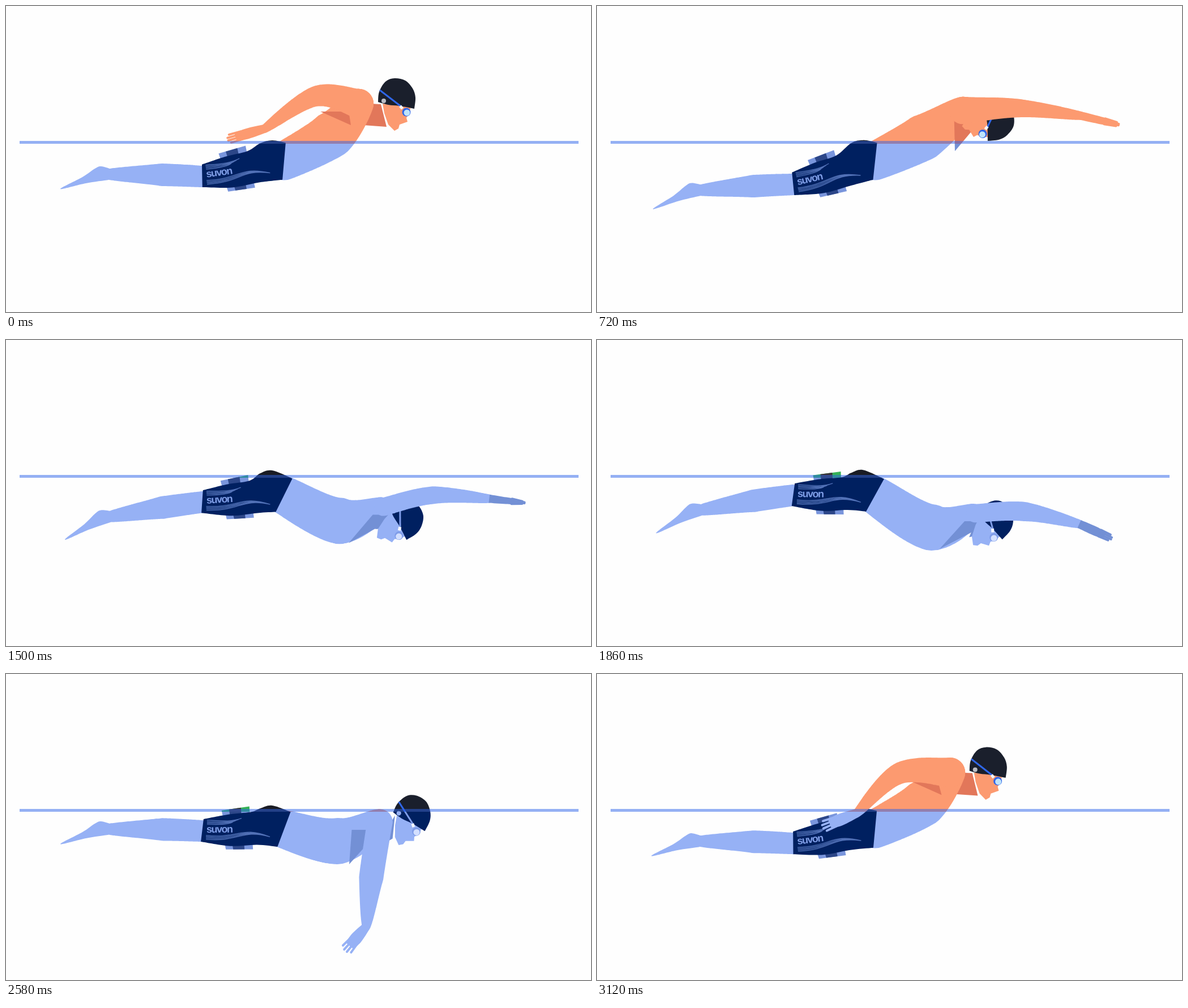
These frames come from a looping animation (1033 by 542 pixels, 3180 ms). An HTML page with a canvas:

```html
<!DOCTYPE html>
<html lang="en">
<head>
<meta charset="utf-8">
<title>Butterfly stroke</title>
<style>
  html, body { margin: 0; width: 100%; height: 100%; overflow: hidden; background: #fefefe; }
  canvas { display: block; }
</style>
</head>
<body>
<canvas id="stage" width="1033" height="542"></canvas>
<script>
const ctx = document.getElementById('stage').getContext('2d');
const LOOP = 3180, STEP = 60, SURFACE = 244;

const AIR = {
  skin: '#fc9a70', palm: '#fc9a70', shade: '#e2775a', suit: '#1a1c24', cap: '#1a1f2c', print: '#7f9de6',
  float: '#35b157', band: '#3a3236', strap: '#2f66e8', lens: '#bfe4fb', badge: '#b9bcc4'
};
const WATER = {
  skin: '#96b1f5', palm: '#7390d5', shade: '#7390d5', suit: '#002060', cap: '#002060', print: '#7f9de6',
  float: '#7995dc', band: '#2c4688', strap: '#7f9ce8', lens: '#d3dfff', badge: '#96b1f5'
};

// time, knee y, shin angle, rib y, shoulder x, y, armpit x, y, head x, y, turn
const poses = [
  [0, 302, 0, 228, 623, 173, 609, 211, 690, 160, 0],
  [720, 316, -5, 233, 646, 185, 632, 257, 705, 204, 78],
  [1140, 305, -10, 295, 665, 269, 605, 336, 707, 313, 68],
  [1860, 275, -10.5, 332, 668, 307, 605, 370, 704, 317, 37],
  [2340, 276, -2.7, 312, 698, 300, 617, 346, 709, 281, 28],
  [2580, 278, -.3, 296, 660, 262, 606, 337, 718, 247, 20]
];
// time, elbow x, y, fingertip x, y
const strokes = [
  [0, 547, 160, 388, 237], [360, 640, 160, 672, 172], [720, 745, 181, 925, 211],
  [1140, 752, 242, 923, 243], [1860, 755, 304, 912, 353], [2340, 759, 345, 768, 500],
  [2460, 718, 358, 688, 525], [2580, 645, 360, 597, 493], [2880, 575, 235, 440, 365],
  [3120, 534, 176, 395, 272]
];

// Periodic monotone cubic interpolation between the rows.
function sample(rows, time) {
  const n = rows.length;
  const row = k => rows[(k + n) % n];
  const at = k => row(k)[0] + Math.floor(k / n) * LOOP;
  let i = n - 1;
  while (rows[i][0] > time) i--;
  const h = at(i + 1) - at(i), u = (time - at(i)) / h;
  return rows[i].slice(1).map((start, c) => {
    const slope = k => (row(k + 1)[c + 1] - row(k)[c + 1]) / (at(k + 1) - at(k));
    const tangent = k => {
      const a = slope(k - 1), b = slope(k);
      return a * b > 0 ? 2 * a * b / (a + b) : 0;
    };
    const delta = row(i + 1)[c + 1] - start, m0 = tangent(i) * h, m1 = tangent(i + 1) * h;
    return start + u * (m0 + u * (3 * delta - 2 * m0 - m1 + u * (m0 + m1 - 2 * delta)));
  });
}

const radians = degrees => degrees * Math.PI / 180;

// Returns a function that turns and moves local points onto the stage.
function placer(x, y, degrees) {
  const c = Math.cos(radians(degrees)), s = Math.sin(radians(degrees));
  return (px, py) => [x + px * c - py * s, y + px * s + py * c];
}
function within(x, y, degrees, draw) {
  ctx.save();
  ctx.translate(x, y);
  ctx.rotate(radians(degrees));
  draw();
  ctx.restore();
}

function curve(points) {
  ctx.lineTo(...points[0]);
  for (let i = 0; i < points.length - 1; i++) {
    const a = points[i - 1] || points[i], b = points[i], c = points[i + 1], d = points[i + 2] || c;
    ctx.bezierCurveTo(b[0] + (c[0] - a[0]) / 6, b[1] + (c[1] - a[1]) / 6,
      c[0] - (d[0] - b[0]) / 6, c[1] - (d[1] - b[1]) / 6, ...c);
  }
}
function shape(color, ...runs) {
  ctx.beginPath();
  runs.forEach(curve);
  ctx.closePath();
  ctx.fillStyle = color;
  ctx.fill();
}
const poly = (color, ...points) => shape(color, ...points.map(p => [p]));

function line(color, width, a, b) {
  ctx.beginPath();
  ctx.moveTo(...a);
  ctx.lineTo(...b);
  ctx.strokeStyle = color;
  ctx.lineWidth = width;
  ctx.stroke();
}
function disc(color, x, y, r) {
  ctx.beginPath();
  ctx.arc(x, y, r, 0, 7);
  ctx.fillStyle = color;
  ctx.fill();
}

// A tapering body part: circles swept along a smooth path through three [x, y, radius] joints.
function limb(color, from, joint, to) {
  const guide = [from, from, joint, to, to];
  ctx.beginPath();
  for (let i = 0; i <= 100; i++) {
    const k = i < 50 ? 0 : 1, u = i / 50 - k;
    const [p, a, b, q] = guide.slice(k, k + 4);
    const bend = j => a[j] + u * ((b[j] - p[j]) / 2 + u * (p[j] - 2.5 * a[j] + 2 * b[j] - q[j] / 2 +
      u * (1.5 * (a[j] - b[j]) + (q[j] - p[j]) / 2)));
    const r = a[2] + (b[2] - a[2]) * u;
    ctx.moveTo(bend(0) + r, bend(1));
    ctx.arc(bend(0), bend(1), r, 0, 7);
  }
  ctx.fillStyle = color;
  ctx.fill();
}

function drawBuoy(c, left, top, bottom) {
  const block = (color, x, width) =>
    poly(color, [x, top - x / 7], [x + width, top - (x + width) / 7], [x + width + 1, bottom], [x + 2, bottom]);
  block(c.float, left, 49);
  block(c.band, left + 13, 21);
}

function drawLegs(c, kneeY, shin, tilt, hipTop) {
  const x = 346, thigh = (277 - kneeY) * .33;
  const knee = placer(x, kneeY, thigh), waist = placer(491, 275, tilt);
  within(x, kneeY, shin, () => {
    limb(c.skin, [0, 0, 19], [-70, -3, 20], [-168, -4, 9]);
    shape(c.skin, [[-160, -13], [-178, -18], [-189, -14], [-211, 1], [-250, 22], [-205, 12], [-165, 6]]);
  });
  within(x, kneeY, thigh, () => {
    drawBuoy(c, 35, -31, -25);
    drawBuoy(c, 40, 28, 33);
  });
  shape(c.suit,
    [knee(3, -21), knee(47, -29), knee(86, -33), [449, hipTop + 5], [470, hipTop], waist(0, -33)],
    [waist(0, 33), knee(97, 25), knee(50, 27), knee(-2, 19)]);
  within(x, kneeY, thigh, () => {
    ctx.globalAlpha = .65;
    ctx.strokeStyle = c.print;
    ctx.lineWidth = 1.3;
    ctx.beginPath();
    for (let i = 0; i < 4; i++) {
      ctx.moveTo(9, -19 + i * 2.4);
      ctx.bezierCurveTo(30, -18 + i * 2.4, 50, -15 + i, 70 - i * 5, -22 + i * 2);
      ctx.moveTo(7, 8 + i * 2.3);
      ctx.bezierCurveTo(68, 14 + i * 2, 68, -9 + i * 2, 120, 11);
    }
    ctx.stroke();
    ctx.globalAlpha = 1;
    ctx.fillStyle = c.print;
    ctx.font = 'bold 18px "Liberation Sans", sans-serif';
    ctx.letterSpacing = '-1.5px';
    ctx.fillText('suvon', 8, 3);
  });
}

function drawHead(c, x, y, turn) {
  within(x, y, turn, () => {
    poly(c.skin, [-25, 13], [-22, 30], [-15, 50], [-4, 61], [3, 57], [5, 50], [19, 45], [17, 38], [22, 30], [25, 18]);
    shape(c.cap, [[-33, 10], [-31, -8], [-20, -26], [-4, -32], [15, -28], [28, -14], [33, 2], [31, 22]],
      [[31, 22], [5, 17], [-15, 15], [-33, 10]]);
    line(c.strap, 3, [-30, -11], [9, 19]);
    disc(c.badge, -23, 8, 4);
    disc(c.strap, 17, 28, 7.5);
    disc(c.lens, 18, 29, 5.5);
    line('#f4f7ff', 5, [6, 17], [10, 22]);
  });
}

function drawHand(c, [x, y, r], [tipX, tipY], spread) {
  const length = Math.hypot(tipX - x, tipY - y);
  const color = tipX > 850 ? c.palm : c.skin;
  within(x, y, Math.atan2(tipY - y, tipX - x) * 180 / Math.PI, () => {
    const palm = r * .6 + spread * .7;
    shape(color, [[0, -r], [length * .45, -palm], [length * .75, -palm * .8]],
      [[length * .75, palm * .8], [length * .45, palm], [0, r]]);
    ctx.lineCap = 'round';
    for (let i = -1.5; i <= 1.5; i++) {
      line(color, 4, [length * .6, i * palm * .5], [length - 2 - Math.abs(i) * 4, i * spread * .7]);
    }
  });
}

function drawSwimmer(c, time) {
  const [kneeY, shin, ribY, sx, sy, pitX, pitY, ...skull] = sample(poses, time);
  const [ex, ey, tipX, tipY] = sample(strokes, time);
  const sink = ribY - 228;

  // The arm looks thicker and the hand opens as the forearm points down.
  const dx = tipX - ex, dy = tipY - ey;
  const down = Math.max(0, dy / Math.hypot(dx, dy));
  const wrist = [ex + dx * .6 + dy * .16 * down, ey + dy * .6 - dx * .16 * down, 7.5];
  const shoulder = [sx, sy, 24 - sink * .09 + 5 * down];
  const pitTop = sx - 20 + (ex - sx) * .3, nape = placer(...skull);

  poly(c.shade, [sx + 20, sy], nape(-28, 14), nape(-18, 54), [sx + 8, sy + 38]);
  limb(c.skin, [491, 275, 33.5], [575 + sink * .15, ribY, 41], shoulder);
  drawLegs(c, kneeY, shin, 5 + sink * .23, 238 - sink * .075);
  poly(c.shade, [pitTop - 25, sy + 14], [pitTop + 25, sy + 14], [pitX, pitY]);
  drawHead(c, ...skull);
  limb(c.skin, shoulder, [ex, ey, 15 + 7 * down], wrist);
  drawHand(c, wrist, [tipX, tipY], 1 + 8 * Math.min(1, 1.7 * down));
}

function drawSide(c, top, bottom, time) {
  ctx.save();
  ctx.beginPath();
  ctx.rect(0, top, 1033, bottom - top);
  ctx.clip();
  drawSwimmer(c, time);
  ctx.restore();
}

function frame(now) {
  const time = Math.floor(now % LOOP / STEP) * STEP;
  ctx.fillStyle = '#fefefe';
  ctx.fillRect(0, 0, 1033, 542);
  drawSide(AIR, 0, SURFACE, time);
  drawSide(WATER, SURFACE, 542, time);
  ctx.fillStyle = 'rgba(45, 100, 235, .5)';
  ctx.fillRect(24, 239, 987, 5);
  requestAnimationFrame(frame);
}
requestAnimationFrame(frame);
</script>
</body>
</html>
```
